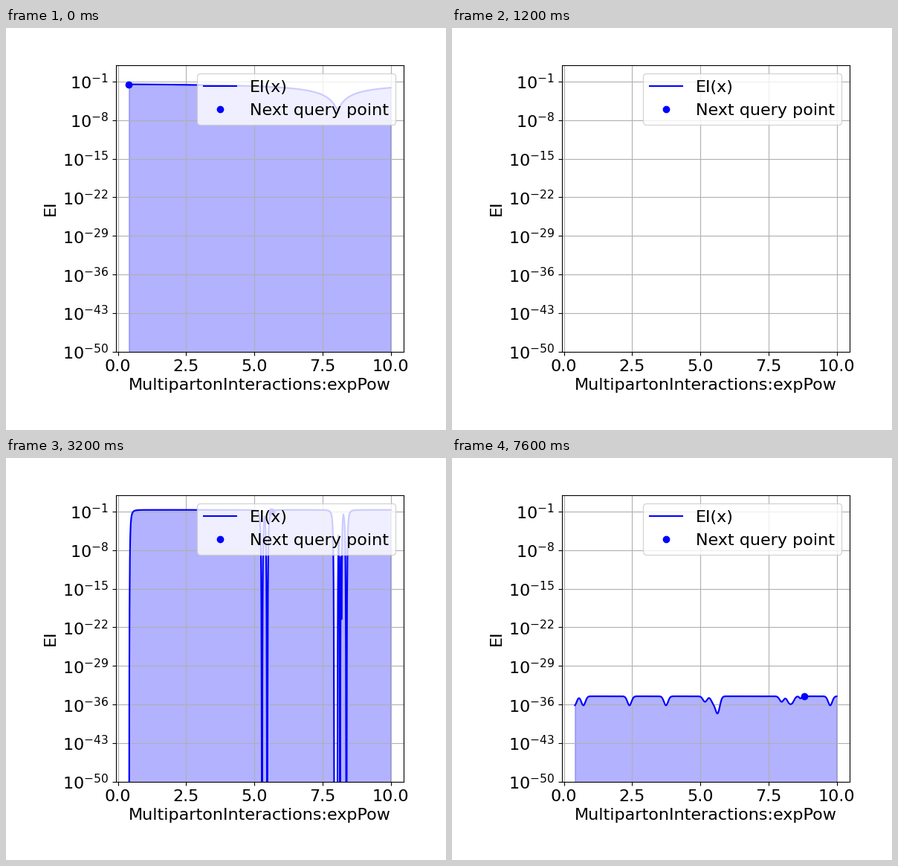
A matplotlib script that plays this animation: 592 px wide and 540 px high, repeating every 8000 ms.

```python
import matplotlib.pyplot as plt
import numpy as np
from matplotlib.animation import FuncAnimation

WIDTH, HEIGHT, DPI = 592, 540, 100
FRAMES = 20
FLOOR, BASE = -60.0, 1e-70
x = np.linspace(0.4, 10, 2401)


def broad_valley(centre):
    """Smooth log10 EI with a single pointed valley."""
    distance = np.hypot(x - centre, 0.03)
    return -1.24 - 5.2 / (1 + distance / 0.4)


def ripples(centres, depth, width=0.075):
    offsets = (x - np.reshape(centres, (-1, 1))) / width
    return -depth * np.exp(-0.5 * offsets ** 2).sum(axis=0)


def walls(level, samples, soft=0.032):
    """Plateau with a steep notch at each sample, the first one being wide.

    A notch is shallower where an older sample lies close by.
    """
    drop = np.zeros_like(x)
    for i, centre in enumerate(samples):
        half = 0.06 if i == 0 else 0.008
        spacing = min((abs(centre - s) for s in samples[:i]), default=1)
        depth = min(60, 360 * spacing)
        distance = np.clip(np.abs(x - centre) - half, 0, None)
        drop = np.maximum(drop, depth * (soft / (soft + distance)) ** 3)
    return level - drop


def build_states():
    """For each frame: log10 of EI over x, and the x of the next query."""
    states = [(np.full_like(x, FLOOR), np.nan)] * FRAMES
    states[0] = broad_valley(8.05), 0.4

    samples = [7.985, 0.4]
    states[1] = walls(-1.05, samples), 8.14
    states[2] = -42.03 + ripples([0.4, 7.95], 0.65), 8.13

    samples.append(8.14)
    steps = zip([8.375, 8.195, 5.47, 5.28, 5.63],
                [-0.67, -1.05, -1.05, -1.05, -0.7])
    for frame, (query, level) in enumerate(steps, 4):
        states[frame] = walls(level, samples), query
        samples.append(query)

    lone = [0.39, 0.71, 2.4, 3.74, 5.6, 5.66, 9.76]
    crowded = [5.17, 5.46, 7.98, 8.25, 8.37]
    rippled = ripples(lone, 1.65) + ripples(crowded, 1.0)
    states[18] = -17.45 + rippled, 8.67
    states[19] = -34.5 + rippled + ripples([8.67], 0.4, 0.04), 8.81
    return states


plt.rcParams.update({"font.family": "DejaVu Sans", "font.size": 16})
fig = plt.figure(figsize=(WIDTH / DPI, HEIGHT / DPI), dpi=DPI)
ax = fig.add_axes([147.7 / WIDTH, 105.15 / HEIGHT,
                   387.5 / WIDTH, 385.2 / HEIGHT])
ax.set_yscale("log")
ax.set_xlim(-0.08, 10.48)
ax.set_ylim(1e-50, 1e2)
ax.set_xticks(np.arange(0, 10.1, 2.5))
ax.set_yticks([10.0 ** p for p in range(-50, 0, 7)])
ax.minorticks_off()
ax.grid(True)
ax.set_xlabel("MultipartonInteractions:expPow")
ax.set_ylabel("EI")

states = build_states()
line, = ax.plot(x, 10 ** states[0][0], color="blue", label="EI(x)")
point, = ax.plot([0.4], [0.03], "o", color="blue", label="Next query point")
area = ax.fill_between(x, BASE, 10 ** states[0][0], color="blue", alpha=0.3)
ax.legend(loc="upper right")


def update(frame):
    curve, query = states[frame]
    values = 10 ** np.maximum(curve, FLOOR)
    line.set_ydata(values)
    area.set_verts([np.column_stack([np.r_[x[0], x, x[-1]],
                                     np.r_[BASE, values, BASE]])])
    point.set_data([query], [10 ** np.interp(query, x, curve)])
    return line, area, point


anim = FuncAnimation(fig, update, frames=FRAMES, interval=400,
                     repeat=True, repeat_delay=0)
plt.show()
```
